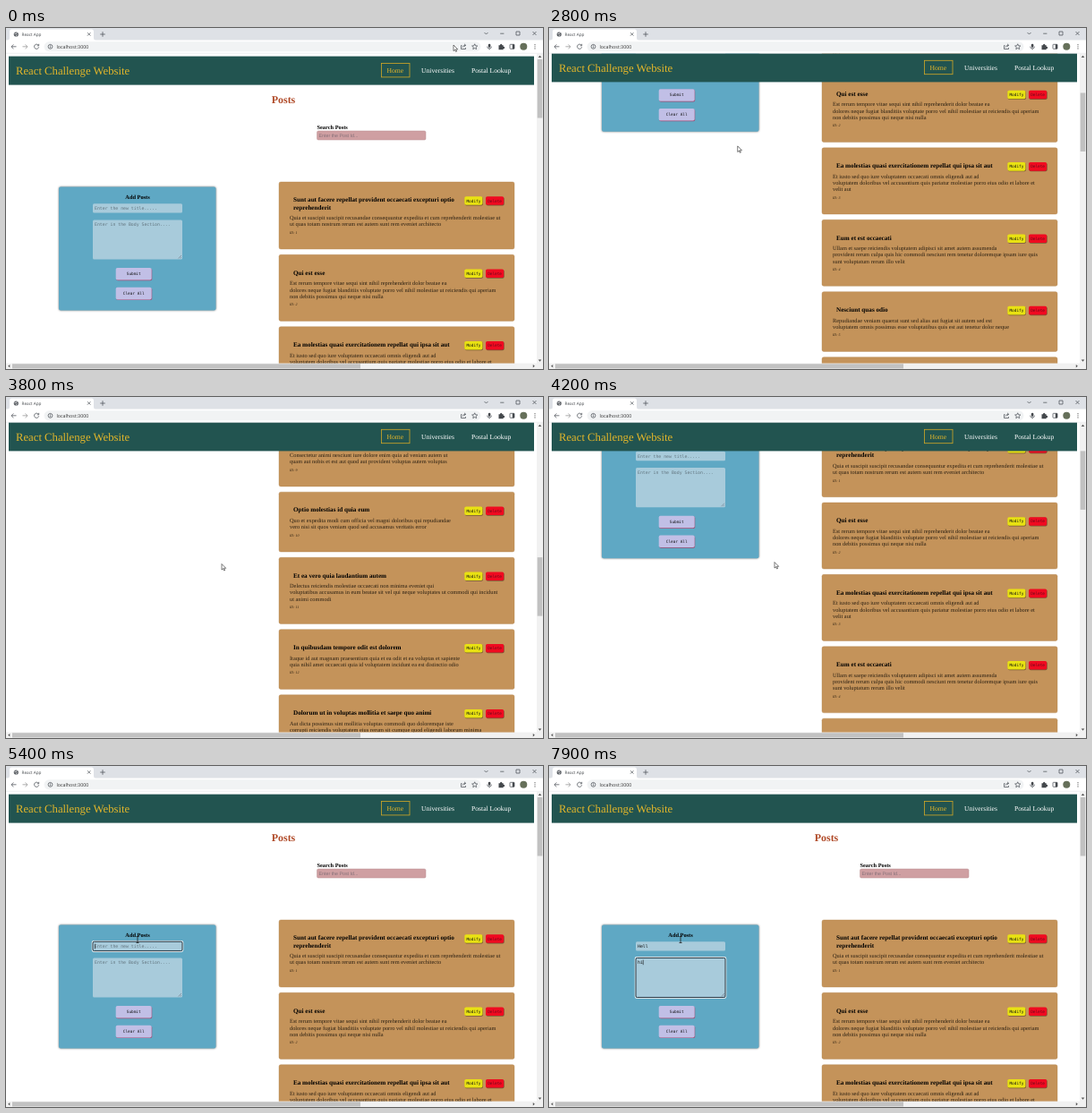
Write an HTML page that moves like this. It is 600x381 px and loops after 8000 ms.

```html
<!DOCTYPE html>
<html lang="en">
<head>
<meta charset="utf-8">
<title>Posts</title>
<style>
  html, body { margin: 0; width: 100%; height: 100%; overflow: hidden; background: #fff; }
  svg { display: block; width: 600px; height: 381px; text-rendering: geometricPrecision; }
  text { white-space: pre; }
  .serif { font-family: "Liberation Serif", serif; }
  .sans { font-family: "Liberation Sans", sans-serif; }
  .ui { font-family: "Open Sans", sans-serif; }
  .mono { font-family: "DejaVu Sans Mono", monospace; }
  .shade { filter: drop-shadow(0 .8px 1px #0008); }
  .line { fill: none; stroke: #555a60; stroke-width: .8; }
</style>
</head>
<body>
<svg id="stage" viewBox="0 0 600 381"></svg>
<script>
const LOOP = 8000;
const LINE = 7.3, HEADING_LINE = 8.2, CARD_GAP = 6.3;
const CHAR = 2.92; // advance of one character in the form fields

// Each post: heading lines, then body lines
const posts = [
  ["Sunt aut facere repellat provident occaecati excepturi optio|reprehenderit",
   "Quia et suscipit suscipit recusandae consequuntur expedita et cum reprehenderit molestiae ut|ut quas totam nostrum rerum est autem sunt rem eveniet architecto"],
  ["Qui est esse",
   "Est rerum tempore vitae sequi sint nihil reprehenderit dolor beatae ea|dolores neque fugiat blanditiis voluptate porro vel nihil molestiae ut reiciendis qui aperiam|non debitis possimus qui neque nisi nulla"],
  ["Ea molestias quasi exercitationem repellat qui ipsa sit aut",
   "Et iusto sed quo iure voluptatem occaecati omnis eligendi aut ad|voluptatem doloribus vel accusantium quis pariatur molestiae porro eius odio et labore et|velit aut"],
  ["Eum et est occaecati",
   "Ullam et saepe reiciendis voluptatem adipisci sit amet autem assumenda|provident rerum culpa quis hic commodi nesciunt rem tenetur doloremque ipsam iure quis|sunt voluptatum rerum illo velit"],
  ["Nesciunt quas odio",
   "Repudiandae veniam quaerat sunt sed alias aut fugiat sit autem sed est|voluptatem omnis possimus esse voluptatibus quis est aut tenetur dolor neque"],
  ["Dolorem eum magni eos aperiam quia",
   "Ut aspernatur corporis harum nihil quis provident sequi mollitia nobis|aliquid molestiae perspiciatis et ea nemo ab reprehenderit accusantium quas voluptate|dolores velit et doloremque molestiae"],
  ["Magnam facilis autem",
   "Dolore placeat quibusdam ea quo vitae magni quis enim qui quis quo|nemo aut saepe quidem repellat excepturi ut quia sunt ut sequi eos ea sed quas"],
  ["Dolorem dolore est ipsam",
   "Dignissimos aperiam dolorem qui eum facilis quibusdam animi sint|suscipit qui sint possimus cum quaerat magni maiores excepturi ipsam ut commodi dolor|voluptatum modi aut vitae"],
  ["Nesciunt iure omnis dolorem tempora et accusantium",
   "Consectetur animi nesciunt iure dolore enim quia ad veniam autem ut|quam aut nobis et est aut quod aut provident voluptas autem voluptas"],
  ["Optio molestias id quia eum",
   "Quo et expedita modi cum officia vel magni doloribus qui repudiandae|vero nisi sit quos veniam quod sed accusamus veritatis error"],
  ["Et ea vero quia laudantium autem",
   "Delectus reiciendis molestiae occaecati non minima eveniet qui|voluptatibus accusamus in eum beatae sit vel qui neque voluptates ut commodi qui incidunt|ut animi commodi"],
  ["In quibusdam tempore odit est dolorem",
   "Itaque id aut magnam praesentium quia et ea odit et ea voluptas et sapiente|quia nihil amet occaecati quia id voluptatem incidunt ea est distinctio odio"],
  ["Dolorum ut in voluptas mollitia et saepe quo animi",
   "Aut dicta possimus sint mollitia voluptas commodi quo doloremque iste|corrupti reiciendis voluptatem eius rerum sit cumque quod eligendi laborum minima|perferendis recusandae assumenda consectetur porro architecto ipsum ipsam"],
].map(parts => parts.map(s => s.split("|")));

const text = (x, y, size, str, cls = "serif", more = "") =>
  `<text x="${x}" y="${y}" font-size="${size}" class="${cls}" ${more}>${str}</text>`;
const rect = (x, y, w, h, fill, r = 0, more = "") =>
  `<rect x="${x}" y="${y}" width="${w}" height="${h}" rx="${r}" fill="${fill}" ${more}/>`;
const path = (d, more = 'class="line"') => `<path d="${d}" ${more}/>`;
const circle = (x, y, r, more = 'class="line"') => `<circle cx="${x}" cy="${y}" r="${r}" ${more}/>`;
const BOLD = 'font-weight="bold"', MIDDLE = 'text-anchor="middle"';

function button(x, y, w, h, fill, label, size, color = "#111", shadow = "#0006") {
  return rect(x + .5, y + .7, w, h, shadow, 1.8) + rect(x, y, w, h, fill, 1.8) +
    text(x + w / 2, y + h / 2 + 1.5, size, label, "mono", `${MIDDLE} fill="${color}"`);
}

function cards() {
  let y = 172, out = "";
  posts.forEach(([heading, body], i) => {
    const extra = (heading.length - 1) * HEADING_LINE;
    const height = 52.2 + extra + body.length * LINE;
    const bodyY = y + 33.9 + extra;
    out += rect(305, y, 263, height, "#c4935a", 2, 'stroke="#b08450" stroke-width=".4"');
    heading.forEach((s, n) => out += text(321, y + 22.3 + n * HEADING_LINE, 7.15, s, "serif", BOLD));
    body.forEach((s, n) => out += text(317, bodyY + n * LINE, 6.355, s, "serif", 'fill="#2a1f12"'));
    out += text(317, bodyY + body.length * LINE + 1.2, 4, `ID: ${i + 1}`, "serif", 'font-style="italic" fill="#2a1f12"');
    out += button(512.3, y + 16.2, 20.2, 9.6, "#e9e212", "Modify", 4.4);
    out += button(536, y + 16.2, 20.2, 9.6, "#f00a20", "Delete", 4.4, "#6b0a1c");
    y += height + CARD_GAP;
  });
  return out;
}

const page = `
  <g id="page">
    ${text(310, 84.3, 11.92, "Posts", "serif", `${BOLD} ${MIDDLE} fill="#b04a28"`)}
    ${text(347.5, 113, 6.355, "Search Posts", "serif", BOLD)}
    ${rect(347.5, 115, 121.5, 10, "#cf9fa2", 1.5, 'stroke="#b98e92" stroke-width=".5"')}
    ${text(349.5, 121.8, 5.3, "Enter the Post Id...", "sans", 'fill="#857078"')}
    ${rect(59, 177.5, 175.5, 138, "#5fa8c4", 2, 'class="shade"')}
    ${text(147, 190.8, 6.355, "Add Posts", "serif", `${BOLD} ${MIDDLE}`)}
    ${rect(97, 196.2, 100, 10.4, "#a8cbdb", 1.5)}
    ${rect(97, 214.4, 100, 44.2, "#a8cbdb", 1.5)}
    ${path("M192.500 257.500l3.500-3.500M194.500 257.500l1.500-1.500", 'stroke="#667" stroke-width=".5"')}
    <rect id="ringOuter" x="96.300" width="101.400" rx="1.800" fill="none" stroke="#eef4f6" stroke-width="1.200"/>
    <rect id="ring" x="97" width="100" rx="1.500" fill="none" stroke="#14202c" stroke-width=".9"/>
    ${text(99, 203.2, 4.85, "", "mono", 'id="title"')}
    ${text(99, 221, 4.85, "", "mono", 'id="body"')}
    <rect id="caret" width=".6" height="5.600" fill="#111"/>
    ${button(122.7, 268, 40, 13.6, "#c1bfe6", "Submit", 4.4, "#111", "#a04a72")}
    ${button(122.7, 289.8, 40, 13.6, "#c1bfe6", "Clear All", 4.4, "#111", "#a04a72")}
    ${cards()}
  </g>
  <g id="header">
    ${rect(3, 31.6, 587, 32, "#225450")}
    ${text(11, 52, 12.71, "React Challenge Website", "serif", 'fill="#e3b62a"')}
    ${rect(419.4, 39.5, 31.6, 15.4, "none", 0, 'stroke="#d3a825" stroke-width=".8"')}
    ${text(425.5, 50, 7.63, "Home", "serif", 'fill="#e3b62a"')}
    ${text(464, 50, 7.63, "Universities", "serif", 'fill="#fff"')}
    ${text(520, 50, 7.63, "Postal Lookup", "serif", 'fill="#fff"')}
  </g>`;

const ARROW = 'fill="#555"';
const browser = `
  ${rect(0, 0, 600, 14, "#dee1e6")}
  ${rect(0, 13.5, 600, 14.7, "#fff")}
  ${path("M1 14q3 0 3-3V4q0-2.500 2.500-2.500h89q2.500 0 2.500 2.500v7q0 3 3 3z", 'fill="#fff"')}
  ${circle(11.3, 7, 2.6, 'fill="#5f6368"')}
  ${path("M9.300 6l2 .8 1-2M11 9l1.500-1.500", 'fill="none" stroke="#fff" stroke-width=".6"')}
  ${text(17.5, 8.9, 4.7, "React App", "ui", 'fill="#45494d"')}
  ${path("M91 5.200l3.400 3.400m0-3.400l-3.400 3.400M105.200 7h5.600M108 4.200v5.600")}
  ${path("M534.500 5l2 2 2-2M552.200 6.200h4.200M570 4h4v4h-4zM588.500 4l4 4m0-4l-4 4")}
  ${path("M11.500 20.800h-5.500m2.400-2.400l-2.400 2.400 2.400 2.400")}
  ${path("M18.500 20.800h5.500m-2.400-2.400l2.400 2.400-2.400 2.400", 'class="line" style="stroke:#999"')}
  ${path("M36.300 19.300a2.600 2.600 0 1 0 .4 2M36.700 17.800v2h-2")}
  ${rect(42.5, 15.3, 488, 11, "#f1f3f4", 5.5)}
  ${circle(49.5, 20.8, 2.4)}${path("M49.500 20.400v1.800M49.500 19.200v.7")}
  ${text(56.5, 22.8, 5.3, "localhost:3000", "ui", 'fill="#333"')}
  ${path("M509.500 19.500h-1v4h5v-1.500M510 21.800q.5-2.500 3.500-2.500m-1.500-1.500l1.700 1.500-1.700 1.500")}
  ${path("M523.700 17.800l.9 2 2.200.2-1.700 1.500.5 2.200-1.900-1.200-1.900 1.200.5-2.200-1.700-1.500 2.200-.2z")}
  ${rect(538.8, 17.8, 2.6, 4, "#44484c", 1.2)}${path("M537.700 20.700q0 2.300 2.400 2.300t2.400-2.300M540.100 23v1.400")}
  ${path("M550.500 19.200h1.500q0-1.500 1.200-1.500t1.200 1.500h1.300v1.500q1.500 0 1.500 1.200t-1.500 1.200v1.200h-5.200z", 'fill="#44484c"')}
  ${rect(563, 18.3, 5, 5, "none", .6, 'class="line"')}${rect(565.8, 18.3, 2.2, 5, "#44484c")}
  ${circle(578.3, 20.8, 4, 'fill="#66705a"')}
  ${[18.7, 20.8, 22.9].map(y => circle(591, y, .6, ARROW)).join("")}
  ${rect(0, 27.9, 600, .4, "#d8dadd")}
  ${rect(593, 28.3, 7, 353, "#f1f1f1")}
  ${rect(0, 374.6, 600, 6.4, "#f1f1f1")}
  ${path("M594.700 33l1.800-2.200 1.800 2.200zM594.700 370.500l1.800 2.200 1.800-2.200z", ARROW)}
  ${path("M4.300 376l-2 1.800 2 1.800zM588.800 376l2 1.800-2 1.800z", ARROW)}
  ${rect(7, 375.3, 389, 5.2, "#c1c1c1")}
  <rect id="thumb" x="593.700" width="5.600" height="65.500" fill="#c1c1c1"/>`;

const pointers = `
  <path id="arrow" d="M0 0v6.600l1.600-1.400 1 2.300 1-.4-1-2.300h2.100z" fill="#fff" stroke="#222" stroke-width=".6"/>
  <path id="beam" d="M-1.500-3.500h3M0-3.500v7M-1.500 3.500h3" fill="none" stroke="#222" stroke-width=".8"/>`;

const stage = document.getElementById("stage");
stage.innerHTML = page + browser + pointers;
const el = id => document.getElementById(id);
const set = (id, attrs) => Object.entries(attrs).forEach(([k, v]) => el(id).setAttribute(k, v));

const scrollKeys = [[2450, 0], [3200, 427], [3800, 770], [4200, 136], [4350, 35], [4600, 0]];
const mouseKeys = [[0, 500, 19], [100, 500, 19], [400, 478, 24], [1100, 474, 25], [1700, 147, 41.5], [1900, 147, 41.5],
  [2500, 206, 125], [3200, 217, 141], [3800, 241, 186.5], [4200, 252, 184.5], [4600, 246, 186], [5200, 147, 194]];
const titleKeys = [5950, 6150, 6350, 6550], bodyKeys = [7450, 7750];
const FOCUS_TITLE = 5250, FOCUS_BODY = 7150;

function sample(keys, t) {
  const next = keys.findIndex(k => k[0] > t);
  if (next === 0) return keys[0].slice(1);
  if (next < 0) return keys.at(-1).slice(1);
  const a = keys[next - 1], b = keys[next], p = (t - a[0]) / (b[0] - a[0]);
  return a.slice(1).map((v, i) => v + (b[i + 1] - v) * p);
}

function field(id, value, placeholder) {
  el(id).textContent = value || placeholder;
  set(id, { fill: value ? "#111" : "#62757f" });
}

function render(t) {
  const [scroll] = sample(scrollKeys, t);
  set("page", { transform: `translate(0 ${-scroll})` });
  set("header", { transform: `translate(0 ${-Math.min(scroll, 3.2)})` });
  set("thumb", { y: 35 + scroll * .1876 });

  const typed = keys => keys.filter(k => k <= t);
  const title = "Hell".slice(0, typed(titleKeys).length);
  const body = "hi".slice(0, typed(bodyKeys).length);
  field("title", title, "Enter the new title.....");
  field("body", body, "Enter in the Body Section....");

  const focused = t >= FOCUS_TITLE, inBody = t >= FOCUS_BODY;
  const top = inBody ? 214.4 : 196.2, height = inBody ? 44.2 : 10.4;
  set("ring", { y: top, height, opacity: +focused });
  set("ringOuter", { y: top - .7, height: height + 1.4, opacity: +focused });
  const lastInput = Math.max(...typed([0, FOCUS_TITLE, FOCUS_BODY, ...titleKeys, ...bodyKeys]));
  set("caret", {
    x: 99 + (inBody ? body : title).length * CHAR,
    y: inBody ? 216.6 : 198.7,
    opacity: +(focused && (t - lastInput) % 1000 < 500),
  });

  const [x, y] = sample(mouseKeys, t), overField = t >= 5150;
  set("arrow", { transform: `translate(${x} ${y})`, opacity: +!overField });
  set("beam", { transform: `translate(${x} ${y})`, opacity: +overField });
}

function tick() {
  render(performance.now() % LOOP);
  requestAnimationFrame(tick);
}
tick();
</script>
</body>
</html>
```
